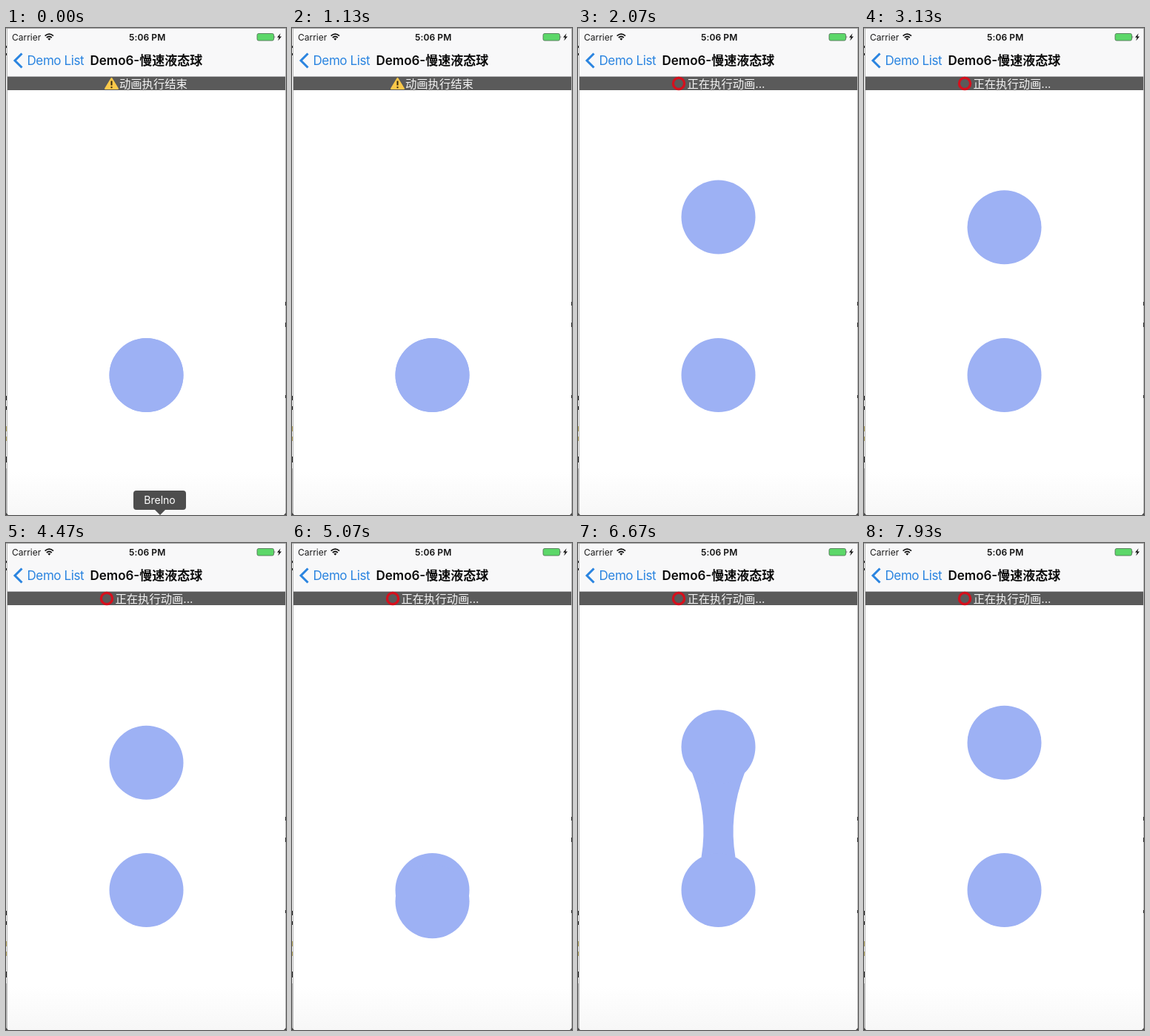
These frames come from a looping animation (378x658 px, 8000 ms). An HTML page:

```html
<!DOCTYPE html>
<html lang="zh">
<head>
<meta charset="utf-8">
<title>Liquid ball</title>
<style>
  html, body { margin: 0; width: 100%; height: 100%; overflow: hidden; background: #fff; }
  svg { display: block; width: 378px; height: 658px; }
  text { font-family: Inter, "Noto Sans CJK SC", "Noto Sans CJK", sans-serif; }
</style>
</head>
<body>
<svg viewBox="0 0 378 658">
  <defs>
    <linearGradient id="shade" x1="0" y1="0" x2="0" y2="1">
      <stop offset="0" stop-color="#fff"/>
      <stop offset="1" stop-color="#f7f7f7"/>
    </linearGradient>
  </defs>
  <rect width="378" height="658" fill="#fff"/>
  <rect y="600" width="378" height="58" fill="url(#shade)"/>

  <!-- navigation bar -->
  <rect width="378" height="66" fill="#f8f8f9"/>
  <rect y="65" width="378" height="1" fill="#bcbcbe"/>
  <text x="8" y="16.5" font-size="12" fill="#1a1a1a">Carrier</text>
  <g fill="none" stroke="#111" stroke-width="1.7">
    <path d="M52.6 10.6Q58.3 5.6 64 10.6"/>
    <path d="M54.8 13Q58.3 10 61.8 13"/>
  </g>
  <path d="M56.3 14.6Q58.3 13 60.3 14.6L58.3 16.8Z" fill="#111"/>
  <text x="190.7" y="16.5" font-size="12" font-weight="600" text-anchor="middle" letter-spacing=".1" fill="#111">5:06 PM</text>
  <rect x="339" y="7.5" width="22.5" height="9.5" rx="2" fill="#5cd769" stroke="#4a6b50" stroke-width=".8"/>
  <path d="M362.6 10.3q1.6 2 0 4z" fill="#333"/>
  <path d="M370.6 7.2l-4.6 5.6h2.6l-1.4 4.4 4.8-5.8h-2.8z" fill="#111"/>
  <path d="M21.5 34.5L12 44l9.500 9.500" fill="none" stroke="#2a84e0" stroke-width="3"/>
  <text x="28.500" y="50" font-size="17" letter-spacing="-.4" fill="#2a84e0">Demo List</text>
  <text x="113.500" y="50" font-size="17" font-weight="600" fill="#0a0a0a">Demo6-慢速液态球</text>

  <!-- status strip -->
  <rect y="66" width="378" height="18" fill="#5a5a5a"/>
  <g font-size="15.3" fill="#f4f4f4">
    <g id="ended">
      <path d="M142.500 68L151 82H134Z" fill="#fbc94a" stroke="#fbc94a" stroke-width="2" stroke-linejoin="round"/>
      <path d="M142.500 71.500V77.500M142.500 79.300V81.300" stroke="#33270c" stroke-width="2"/>
      <text x="153" y="81">动画执行结束</text>
    </g>
    <g id="running">
      <circle cx="136" cy="75" r="7.600" fill="none" stroke="#d5101d" stroke-width="3.300"/>
      <text x="147.500" y="81">正在执行动画...</text>
    </g>
  </g>

  <g fill="#9db1f4">
    <path id="neck"/>
    <circle cx="189.500" cy="469" r="50"/>
    <circle id="ball" cx="189.500" cy="469" r="50"/>
  </g>

  <g id="tip">
    <path d="M176 625H239a4 4 0 0 1 4 4V647a4 4 0 0 1-4 4H215L208 658L201 651H176a4 4 0 0 1-4-4V629a4 4 0 0 1 4-4Z" fill="#4d4d4d"/>
    <text x="207.500" y="643" font-size="14" text-anchor="middle" fill="#fff">Brelno</text>
  </g>

  <!-- window edges and what lies behind them -->
  <path d="M1.500 0V658M377.500 0V658" stroke="#b9b9b9"/>
  <rect width="378" height="1" fill="#a5a5a5"/>
  <rect y="1" width="1" height="594" fill="#f0f0f0"/>
  <rect y="595" width="1" height="63" fill="#b4b4b4"/>
  <path d="M.5 24v3M.5 34v3M.5 497v6M.5 511v5M.5 579v8M377.500 370v5M377.500 398v6M377.500 496v4" stroke="#222"/>
  <path d="M.5 538v7M.5 552v6" stroke="#b5a55a"/>
  <path d="M0 655l3 3H0zM378 655l-3 3h3z" fill="#444"/>
</svg>
<script>
const LOOP = 8000, CX = 189.5, HOME = 469, R = 50, TRAVEL = 201;
const SNAP = 200, DAMP = 0.58;
const UP1 = 1232, DOWN = 4384, UP2 = 5979;
const UP_RATE = 3.65, DOWN_RATE = 6.97;
const el = id => document.getElementById(id);
const ball = el('ball'), neck = el('neck'), tip = el('tip');
const ended = el('ended'), running = el('running');

// Underdamped step response: 0 to 1 with overshoot
function spring(ms, rate) {
  const s = Math.max(0, ms) / 1000 * rate, q = Math.sqrt(1 - DAMP * DAMP);
  return 1 - Math.exp(-DAMP * s) * (Math.cos(q * s) + DAMP / q * Math.sin(q * s));
}

function height(t) {
  if (t < UP1) return 0;
  if (t < DOWN) return TRAVEL * spring(t - UP1, UP_RATE);
  if (t < UP2) return TRAVEL * (1 - spring(t - DOWN, DOWN_RATE));
  return TRAVEL * spring(t - UP2, UP_RATE);
}

// The neck lives only during the first rise, until it snaps
function joined(t, d) {
  const start = t >= UP2 ? UP2 : UP1;
  return t > start && t - start < 760 && d < SNAP;
}

function neckPath(d) {
  const a = Math.PI / 4, b = a - 0.307 * d / 193;
  const top = HOME - d + R * Math.cos(a), low = HOME - R * Math.cos(b);
  const w1 = R * Math.sin(a), w2 = R * Math.sin(b), wc = R * (1 - d / 264);
  const mid = (top + low) / 2;
  return `M${CX - w1} ${top}Q${CX - wc} ${mid} ${CX - w2} ${low}` +
    `H${CX + w2}Q${CX + wc} ${mid} ${CX + w1} ${top}Z`;
}

function show(node, on) { node.setAttribute('opacity', on); }

function draw(t) {
  const d = height(t), busy = t >= UP1;
  ball.setAttribute('cy', HOME - d);
  neck.setAttribute('d', joined(t, d) ? neckPath(d) : '');
  show(ended, busy ? 0 : 1);
  show(running, busy ? 1 : 0);
  show(tip, Math.min(1, Math.max(0, 1 - (t - 70) / 180)));
}

const begin = performance.now();
function tick() {
  draw((performance.now() - begin) % LOOP);
  requestAnimationFrame(tick);
}
draw(0);
requestAnimationFrame(tick);
</script>
</body>
</html>
```
